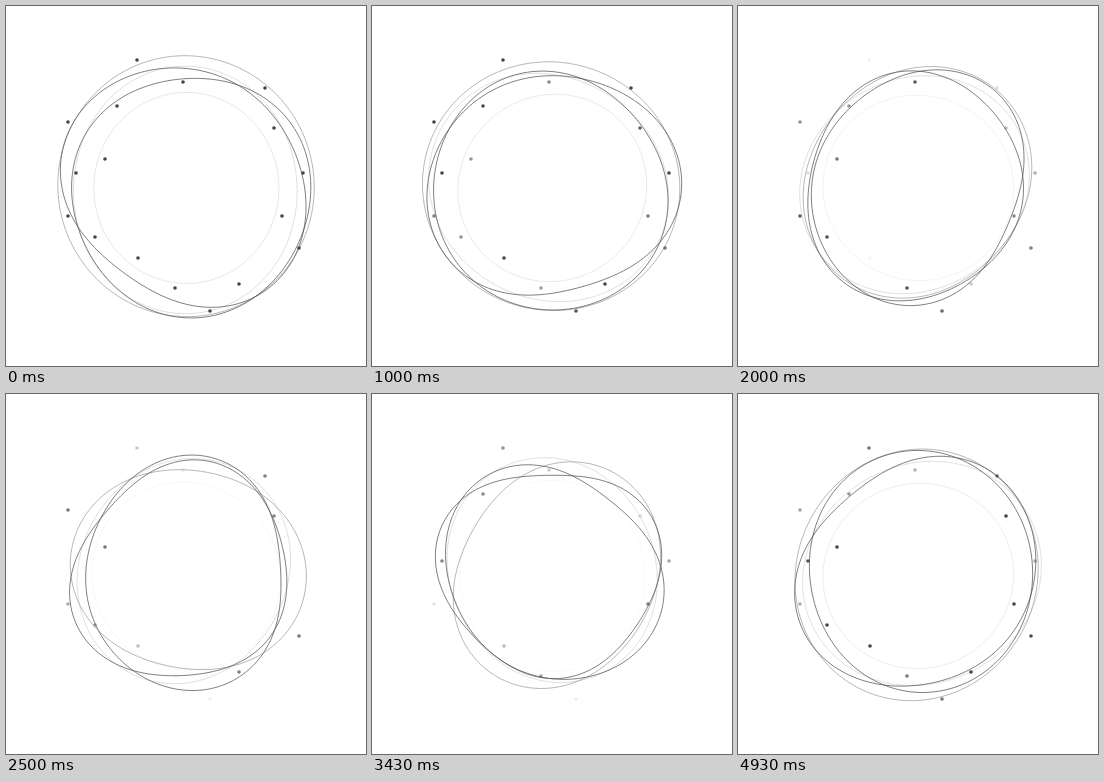
Recreate the animation shown at these times as an HTML page with a canvas. Size 360 by 360 pixels, loop 5000 ms.

```html
<!DOCTYPE html>
<html lang="en">
<head>
<meta charset="utf-8">
<title>Wobbling rings</title>
<style>
  html, body { margin: 0; width: 100%; height: 100%; overflow: hidden; background: #fff; }
  canvas { display: block; width: 360px; height: 360px; }
</style>
</head>
<body>
<canvas id="stage" width="360" height="360"></canvas>
<script>
const ctx = document.getElementById('stage').getContext('2d');
const LOOP = 5000, FPS = 14, CENTER = 180, STEPS = 180, TURN = 2 * Math.PI;
const rad = deg => deg * Math.PI / 180;
const clamp = v => Math.max(0, Math.min(1, v));

const spots = [
  [131, 54], [177, 76], [259, 82], [268, 122], [111, 100], [62, 116],
  [99, 153], [70, 167], [62, 210], [89, 231], [132, 252], [169, 282],
  [204, 305], [233, 278], [276, 210], [297, 167], [293, 242]
];

// Shared breathing: 1 is fully open, -1 fully drawn in.
const breath = t => Math.cos(TURN * (t - 0.3) / 5.6);

// A lobe is [count, height, angle of its peak in degrees].
function ring(color, width, radius, lobes) {
  ctx.beginPath();
  for (let i = 0; i < STEPS; i++) {
    const a = TURN * i / STEPS;
    const r = lobes.reduce((sum, [n, amp, peak]) => sum + amp * Math.cos(n * (a - rad(peak))), radius);
    ctx.lineTo(CENTER + r * Math.cos(a), CENTER + r * Math.sin(a));
  }
  ctx.closePath();
  ctx.strokeStyle = color;
  ctx.lineWidth = width;
  ctx.stroke();
}

function drawRings(t) {
  const b = breath(t), turn = 52 * t, settle = Math.exp(-t);

  ctx.globalAlpha = 0.5 + 0.3 * b;
  ring('#ccc', 0.6, 94, [[1, 2, 80], [2, 1.5, 90 + turn]]);
  ctx.globalAlpha = 1;
  ring('#ccc', 0.6, 113 + 5 * b, [[1, 4, 100 + turn], [2, 6, 90 - 60 * t]]);

  ring('#999', 0.7, 118 + 12 * b, [
    [1, 3 - 3 * b, 81 + 87 * t],
    [2, 6 - 5 * b, 118 * t - 104]
  ]);
  ring('#555', 0.75, 113 + 7 * b, [
    [1, 4 + 7 * settle, 60 + turn],
    [2, 5 - 5 * settle, 5 + turn],
    [3, 2 - 5 * b, 28 + turn]
  ]);
  ring('#555', 0.75, 113 + 7 * b, [
    [2, 10, 40 - turn],
    [3, 3, 62 - turn]
  ]);
}

// Spots twinkle out of step and dim as the rings draw in.
function drawSpots(t) {
  const level = 0.65 + 0.45 * breath(t);
  ctx.fillStyle = '#444';
  spots.forEach(([x, y], k) => {
    ctx.globalAlpha = clamp(level + 0.45 * Math.sin(t * (2.5 + k % 3 * 0.5) + k * 2.4) * clamp(t * 2));
    ctx.beginPath();
    ctx.arc(x, y, 1.8, 0, TURN);
    ctx.fill();
  });
  ctx.globalAlpha = 1;
}

function tick() {
  const now = performance.now() % LOOP;
  const t = Math.floor((now + 5) * FPS / 1000) % (LOOP * FPS / 1000) / FPS;
  ctx.fillStyle = '#fff';
  ctx.fillRect(0, 0, 360, 360);
  drawRings(t);
  drawSpots(t);
  requestAnimationFrame(tick);
}
tick();
</script>
</body>
</html>
```
